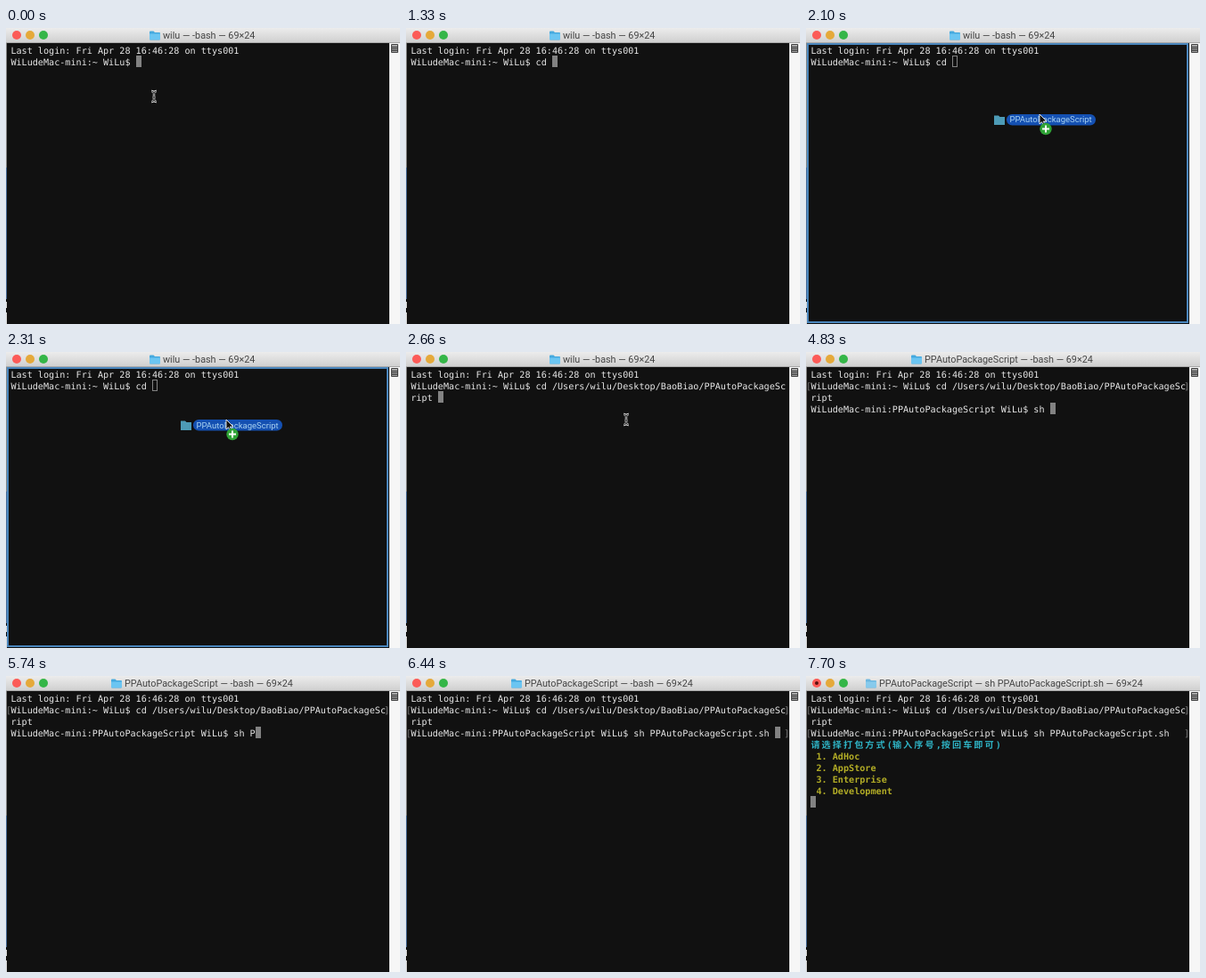
Recreate the animation shown at these times as an HTML page. Size 442 by 333 pixels, loop 8 s.

```html
<!DOCTYPE html>
<html lang="en">
<head>
<meta charset="utf-8">
<title>Terminal</title>
<style>
html, body { margin: 0; width: 442px; height: 333px; overflow: hidden; background: #111; }
body { position: relative; }
div, svg { position: absolute; }
svg { overflow: visible; }
#bar { left: 0; top: 0; width: 442px; height: 17px; background: linear-gradient(#ececec, #d0d0d0); border-bottom: 1px solid #a8a8a8; box-sizing: border-box; }
#bar i { position: absolute; top: 3px; width: 10px; height: 10px; border-radius: 50%; }
#dot { left: 10px; top: 6px; width: 4px; height: 4px; border-radius: 50%; background: #5a0f0d; }
#title { top: 2px; font: 10.8px/13px Roboto, sans-serif; color: #444; white-space: pre; }
#edge { left: 0; top: 17px; width: 1px; height: 316px; background: linear-gradient(#8a8a8a 140px, #4d6f9b 140px 288px, #111 288px 291px, #ddd 291px 298px, #111 298px 303px, #ddd 303px); }
#scroll { left: 430px; top: 17px; width: 12px; height: 316px; background: #f6f6f6; }
#rows, #marks { font: 10.15px/13px "DejaVu Sans Mono", monospace; text-rendering: geometricPrecision; color: #e8e8e8; white-space: pre; }
#rows { left: 5.4px; top: 20px; }
#rows div { position: static; height: 13px; }
#rows div:nth-child(n+5) { font-weight: bold; color: #b3ad26; }
#rows div:nth-child(5) { color: #2fb4c6; }
#rows span { font-family: "Noto Sans CJK SC", "Noto Sans CJK", sans-serif; letter-spacing: 2.07px; line-height: 0; }
#marks div { left: 0; height: 13px; color: #777; }
#marks b { position: absolute; left: 424px; font-weight: normal; }
#caret { width: 6px; height: 13px; box-sizing: border-box; background: #828282; border: 1px solid #828282; }
#caret.hollow { background: none; }
#focus { left: 1px; top: 17px; width: 428px; height: 315px; box-sizing: border-box; border: 2px solid #4a86bd; }
#drag { left: 0; top: 0; }
#drag text { font: 9.5px Roboto, sans-serif; fill: #a9d3f2; }
</style>
</head>
<body>
<div id="rows"></div>
<div id="marks"><div style="top:33px">[<b>]</b></div><div style="top:59px">[<b>]</b></div></div>
<div id="caret"></div>
<div id="edge"></div>
<div id="scroll"><svg width="11" height="12"><path d="M2.500 1.500h7v9h-7z" fill="#aaa" stroke="#444"/><path d="M3 4.500h6M3 6.500h6M3 8.500h6" stroke="#333"/></svg></div>
<div id="bar">
  <i style="left:7px;background:#fc5b57"></i><i style="left:22px;background:#e5a93a"></i><i style="left:37px;background:#35b648"></i>
  <div id="dot"></div>
  <svg id="icon" width="12" height="11" style="top:3px"><path d="M0 1.5Q0 .5 1 .5H4.5L6 2H11Q12 2 12 3V9.500Q12 10.500 11 10.500H1Q0 10.500 0 9.500Z" fill="#45a9de"/><path d="M0 3.500H12V10H0Z" fill="#6bc5f2"/></svg>
  <div id="title"></div>
</div>
<div id="focus"></div>
<svg id="beam" width="8" height="14" fill="none">
  <path id="stem" d="M1 1Q4 1 4 3.500Q4 1 7 1M4 3V11M1 13Q4 13 4 10.500Q4 13 7 13M2.500 8H5.500" stroke="#ddd" stroke-width="2.400"/>
  <path d="M1 1Q4 1 4 3.500Q4 1 7 1M4 3V11M1 13Q4 13 4 10.500Q4 13 7 13M2.500 8H5.500" stroke="#222" stroke-width=".9"/>
</svg>
<!-- origin is the pointer tip -->
<svg id="drag" width="1" height="1">
  <path d="M-51 1.500h5l1.500 1.500h5.500v9h-12z" fill="#4d9bb6"/>
  <rect x="-37" y="0" width="100" height="12.500" rx="6.250" fill="#1450b2"/>
  <text x="-33.500" y="9.500">PPAutoPackageScript</text>
  <path d="M0 0V11L2.500 8.700L4.200 12.300L6 11.500L4.400 8H8Z" fill="#111" stroke="#eee" stroke-width=".9"/>
  <circle cx="7" cy="16.500" r="6.700" fill="#2fa336"/>
  <path d="M3 16.500h8M7 12.500v8" stroke="#fff" stroke-width="2"/>
</svg>
<script>
const $ = id => document.getElementById(id);
const LOOP = 8000, STEP = 70, COLS = 69, CELL = 6.11, ROW = 13;
const user = "WiLu", host = user + "deMac-mini", folder = "PPAutoPackageScript";
const prompt = dir => `${host}:${dir} ${user}$ `;

// Terminal output: time, appended text
const output = [
  [0, "Last login: Fri Apr 28 16:46:28 on ttys001\n" + prompt("~")],
  [280, "c"], [420, "d"], [770, " "],
  [2660, `/Users/${user.toLowerCase()}/Desktop/BaoBiao/${folder} `],
  [3710, "\n"], [3780, prompt(folder)],
  [4620, "s"], [4760, "h"], [4830, " "],
  [5740, "P"], [5880, "P"], [6370, "AutoPackageScript.sh "],
  [7560, "\n"],
  [7630, "请选择打包方式(输入序号,按回车即可)\n 1. AdHoc\n 2. AppStore\n 3. Enterprise\n 4. Development\n"]
];

// Window titles: time, icon x, text x, text
const titles = [
  [0, 161, 176, user.toLowerCase() + " — -bash — 69×24"],
  [3780, 118, 133, folder + " — -bash — 69×24"],
  [7630, 67, 82, `${folder} — sh ${folder}.sh — 69×24`]
];

const show = (el, on) => { el.style.display = on ? "" : "none"; };
const place = (el, x, y) => { el.style.transform = `translate(${x}px,${y}px)`; };
const within = (t, a, b) => t >= a && t < b;

let shown = "";
function drawText(t) {
  const text = output.filter(o => o[0] <= t).map(o => o[1]).join("");
  if (text === shown) return;
  shown = text;
  const lines = text.split("\n").flatMap(line => {
    const parts = [];
    // a trailing space on a full line does not open a new row
    do { parts.push(line.slice(0, COLS)); line = line.slice(COLS); } while (line.trim());
    return parts;
  });
  $("rows").innerHTML = lines.map(line =>
    `<div>${line.replace(/[\u4e00-\u9fff]+/g, "<span>$&</span>")}</div>`).join("");
  const last = lines.length - 1;
  place($("caret"), Math.round(5 + lines[last].length * CELL), 18 + last * ROW);
}

function drawTitle(t) {
  const [, iconX, textX, label] = titles.filter(o => o[0] <= t).pop();
  const running = t >= 7630;
  show($("dot"), running);
  $("icon").style.left = iconX + "px";
  $("icon").style.opacity = running ? .75 : 1;
  $("title").style.left = textX + "px";
  if ($("title").textContent !== label) $("title").textContent = label;
}

function drawMouse(t) {
  const dragging = within(t, 1960, 2660);
  show($("focus"), dragging);
  show($("drag"), dragging);
  $("caret").className = dragging ? "hollow" : "";
  if (dragging) {
    const left = Math.max(0, 1 - Math.floor((t - 1960) / STEP) / 5) ** 3;
    place($("drag"), 247 + 69.4 * left, 76 + 97.2 * left);
  }
  const early = t < 280 || within(t, 910, 980);
  show($("beam"), early || within(t, 2660, 3710));
  place($("beam"), early ? 162 : 243, early ? 70 : 69);
}

const [markA, markB] = $("marks").children;
const start = performance.now();
function frame() {
  const t = (performance.now() - start) % LOOP;
  drawText(t);
  drawTitle(t);
  drawMouse(t);
  show(markA, t >= 3710);
  show(markB, t >= 6370);
  requestAnimationFrame(frame);
}
frame();
</script>
</body>
</html>
```
